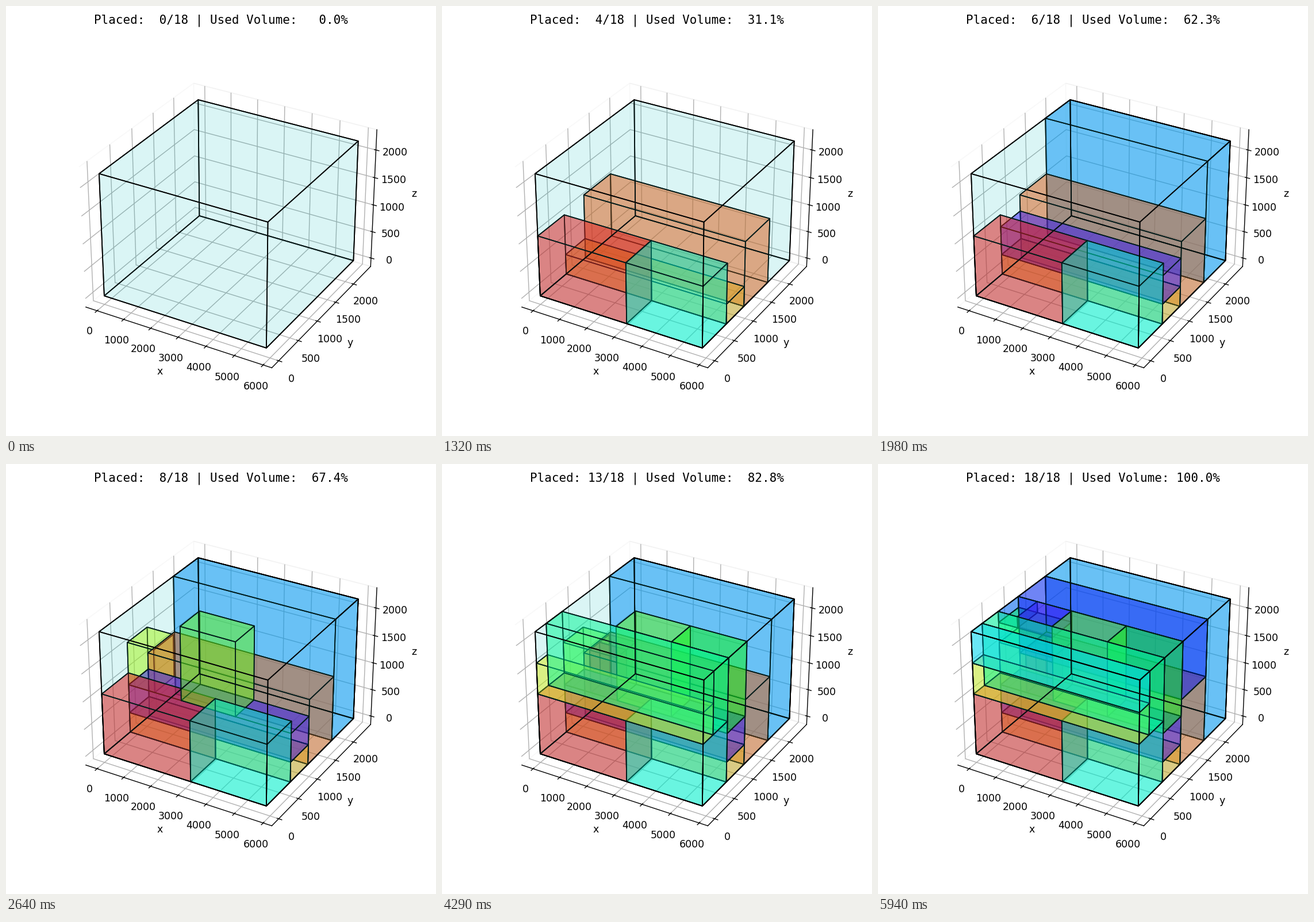
These frames come from a looping animation (748 by 748 pixels, 6270 ms). A matplotlib script:

```python
import colorsys

import matplotlib.pyplot as plt
from matplotlib.animation import FuncAnimation
from mpl_toolkits.mplot3d.art3d import Poly3DCollection

DPI = 125
SIDE = 748.001 / DPI  # the fraction guards against truncation to 747 px
STEP_MS = 330
L, W, H = 5870, 2330, 2200  # container

# Cutting planes shared by the packed boxes
XA, XB, XC, XD, XE = 703, 978, 1957, 3195, 3913
YA, YB, YC, YD, YE = 243, 603, 834, 1065, 1713
ZA, ZB, ZC, ZD, ZE, ZF = 365, 882, 1100, 1180, 1650, 2005

# (hue in degrees, x range, y range, z range) in packing order
BOXES = [
    (0, (0, XD), (0, YB), (0, ZC)),
    (19, (0, L), (YD, YE), (0, ZD)),
    (38, (0, L), (YB, YD), (0, ZA)),
    (169, (XD, L), (0, YB), (0, ZC)),
    (207, (0, L), (YE, W), (0, H)),
    (255, (0, L), (YB, YD), (ZA, ZB)),
    (74, (0, XB), (YB, YD), (ZB, ZE)),
    (92, (XC, XE), (YB, YD), (ZB, H)),
    (116, (XE, L), (YB, YD), (ZB, H)),
    (133, (XB, XC), (YC, YD), (ZB, ZE)),
    (343, (XB, XC), (YB, YC), (ZB, ZE)),
    (58, (0, L), (0, YA), (ZC, ZE)),
    (154, (0, L), (YA, YB), (ZC, H)),
    (140, (0, XC), (YB, YD), (ZE, ZF)),
    (187, (0, L), (0, YA), (ZE, H)),
    (243, (0, L), (YD, YE), (ZD, H)),
    (223, (0, XA), (YB, YD), (ZF, H)),
    (272, (XA, XC), (YB, YD), (ZF, H)),
]


def box_faces(xs, ys, zs):
    """Return the six quads of an axis-aligned box."""
    (x0, x1), (y0, y1), (z0, z1) = xs, ys, zs
    faces = [[(x0, y0, z), (x1, y0, z), (x1, y1, z), (x0, y1, z)] for z in zs]
    faces += [[(x0, y, z0), (x1, y, z0), (x1, y, z1), (x0, y, z1)] for y in ys]
    faces += [[(x, y0, z0), (x, y1, z0), (x, y1, z1), (x, y0, z1)] for x in xs]
    return faces


def add_box(ax, rgba, *ranges):
    poly = Poly3DCollection(box_faces(*ranges), facecolors=[rgba],
                            edgecolors="black", linewidths=1)
    ax.add_collection3d(poly)
    return poly


def volume(box):
    result = 1
    for low, high in box[1:]:
        result *= high - low
    return result


def limits(size):
    # 5 % data margin plus 1/48 view margin on each side
    pad = size * (0.05 + 1.1 / 48)
    return -pad, size + pad


fig = plt.figure(figsize=(SIDE, SIDE), dpi=DPI)
ax = fig.add_subplot(projection="3d")
ax.set_xlim(*limits(L), view_margin=0)
ax.set_ylim(*limits(W), view_margin=0)
ax.set_zlim(*limits(H), view_margin=0)
ax.set_xlabel("x")
ax.set_ylabel("y")
ax.set_zlabel("z")
for axis in (ax.xaxis, ax.yaxis, ax.zaxis):
    axis.pane.set_fill(False)

title = fig.suptitle("", family="DejaVu Sans Mono", fontsize=12)
packed = [add_box(ax, (*colorsys.hsv_to_rgb(hue / 360, 1, 1), 0.3), *ranges)
          for hue, *ranges in BOXES]
# Added last so that its outline wins ties in the depth order
container = add_box(ax, (0, 0.75, 0.75, 0.075), (0, L), (0, W), (0, H))


def update(count):
    for i, poly in enumerate(packed):
        poly.set_visible(i < count)
    used = 100 * sum(map(volume, BOXES[:count])) / (L * W * H)
    title.set_text(f"Placed: {count:2d}/{len(BOXES)} | Used Volume: {used:5.1f}%")
    return [title, *packed]


anim = FuncAnimation(fig, update, frames=len(BOXES) + 1, interval=STEP_MS,
                     init_func=lambda: update(0), repeat=True, repeat_delay=0)
plt.show()
```
